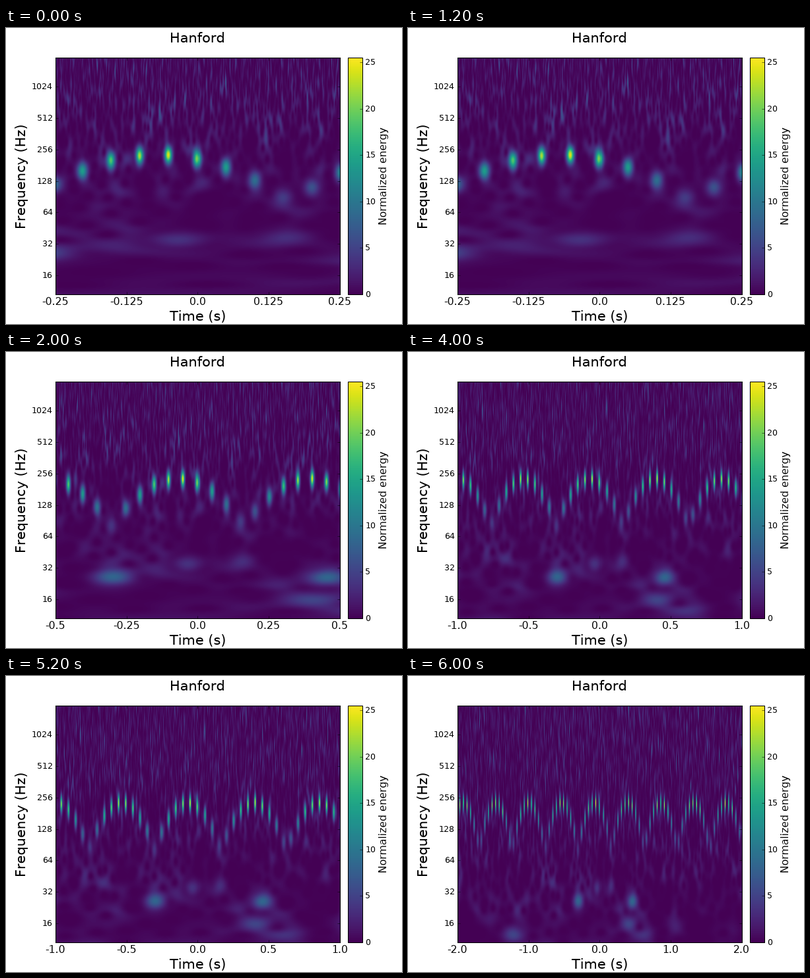
A matplotlib script that plays this animation: 600 by 450 pixels, repeating every 8 s.

```python
import numpy as np
import matplotlib.pyplot as plt
from matplotlib.animation import FuncAnimation

W, H, DPI = 600, 450, 75
plt.rcParams.update({
    "font.family": "DejaVu Sans",
    "text.hinting": "default",
    "text.kerning_factor": 6,
    "ytick.alignment": "center",
    "axes.linewidth": 1,
})

HALF_SPANS = [0.25, 0.5, 1.0, 2.0]      # seconds either side of zero
OCT_LOW, OCT_HIGH = 3.393, 10.924       # log2 of the frequency limits
ROWS, COLS = 360, 430
MAX_ENERGY = 25.5

octaves = OCT_LOW + (np.arange(ROWS) + 0.5) * (OCT_HIGH - OCT_LOW) / ROWS
columns = (np.arange(COLS) + 0.5) * 2 / COLS - 1

PULSE_STEP = 0.0504                     # seconds between bursts
ARCH_STEP, ARCH_START = 0.463, -0.07    # bursts rise and fall along arches


def arch_bursts():
    """Evenly spaced bursts, highest and strongest at the top of each arch."""
    for k in range(-40, 41):
        t = k * PULSE_STEP - 0.001
        phase = (t - ARCH_START) / ARCH_STEP
        offset = (phase - round(phase)) * ARCH_STEP
        yield t, 228 * 2 ** (-28 * offset**2), 23 * 2 ** (-50 * offset**2)


# Slow features: time (s), frequency (Hz), energy
SLOW = [(-0.296, 26, 8), (0.452, 26, 8), (0.4, 16, 4),
        (-0.035, 35, 3.5), (0.15, 37, 2.5), (-1.21, 12.5, 5)]


def blob_map(blobs, half, cycles, octave_width):
    total = np.zeros((ROWS, COLS))
    for t, freq, energy in blobs:
        across = np.exp(-0.5 * ((columns * half - t) * freq / cycles) ** 2)
        up = np.exp(-0.5 * ((octaves - np.log2(freq)) / octave_width) ** 2)
        total += energy * np.outer(up, across)
    return total


def noise_maps():
    """Constant-Q energy of white noise, sampled for every time span."""
    rate, count = 8192, 32768
    rng = np.random.default_rng(7)
    spectrum = rng.normal(size=count) + 1j * rng.normal(size=count)
    bins = np.arange(count) * rate / count
    times = np.arange(count) / rate - 2
    maps = np.zeros((len(HALF_SPANS), ROWS, COLS))
    for row, octave in enumerate(octaves):
        freq = 2**octave
        window = np.exp(-0.5 * ((bins - freq) / (0.133 * freq)) ** 2)
        energy = np.abs(np.fft.ifft(spectrum * window)) ** 2
        gain = 0.5 + 0.4 / (1 + np.exp(-4 * (octave - 8.3)))
        energy *= gain / energy.mean()
        for k, half in enumerate(HALF_SPANS):
            maps[k, row] = np.interp(columns * half, times, energy)
    return maps


MAPS = [noise
        + blob_map(arch_bursts(), half, cycles=1.0, octave_width=0.19)
        + blob_map(SLOW, half, cycles=1.2, octave_width=0.17)
        for noise, half in zip(noise_maps(), HALF_SPANS)]


def pixel_axes(left, right, top=45, bottom=405):
    return fig.add_axes([left / W, 1 - bottom / H, (right - left) / W, (bottom - top) / H])


fig = plt.figure(figsize=(W / DPI, H / DPI), dpi=DPI, facecolor="white")
ticks = dict(direction="in", length=4, width=0.5, pad=4)

ax = pixel_axes(75, 505.56)
image = ax.imshow(MAPS[0], cmap="viridis", vmin=0, vmax=MAX_ENERGY, origin="lower",
                  extent=(-1, 1, OCT_LOW, OCT_HIGH), aspect="auto",
                  interpolation="nearest")
ax.set_xticks([-1, -0.5, 0, 0.5, 1])
ax.set_yticks(range(4, 11), [str(2**k) for k in range(4, 11)])
ax.tick_params(axis="x", labelsize=15, top=True, **ticks)
ax.tick_params(axis="y", labelsize=12, right=True, **ticks)
ax.set_title("Hanford", size=20, y=1.05, pad=5)
ax.set_xlabel("Time (s)", size=20, labelpad=5)
ax.set_ylabel("Frequency (Hz)", size=20, labelpad=5)

cax = pixel_axes(518.47, 540)
bar = fig.colorbar(image, cax=cax, ticks=range(0, 26, 5))
bar.outline.set_linewidth(1)
bar.set_label("Normalized energy", size=15, labelpad=5)
cax.tick_params(labelsize=12, **ticks)


def update(frame):
    half = HALF_SPANS[frame]
    image.set_data(MAPS[frame])
    ax.set_xticklabels([str(half * k) for k in (-1, -0.5, 0, 0.5, 1)])
    return [image]


anim = FuncAnimation(fig, update, frames=len(HALF_SPANS), interval=2000,
                     repeat=True, repeat_delay=0, blit=False)
plt.show()
```
